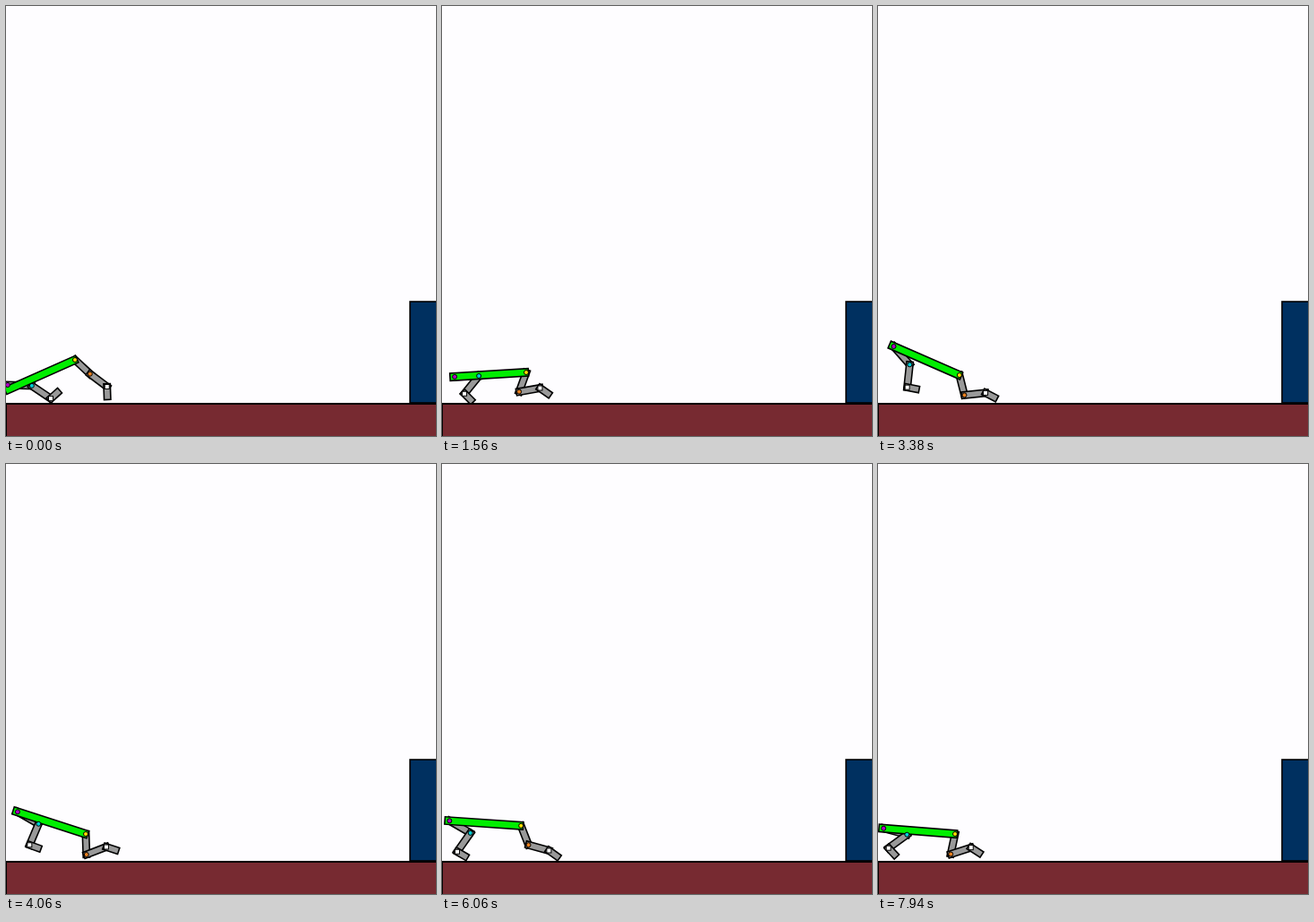
An HTML page that plays this animation: 480x480 px, repeating every 8 s.

```html
<!DOCTYPE html>
<html lang="en">
<head>
<meta charset="utf-8">
<title>Four-legged runner</title>
<style>
  html, body { margin: 0; width: 100%; height: 100%; overflow: hidden; background: #fefdff; }
  svg { display: block; width: 100vw; height: 100vh; }
  #dog rect { stroke: #000; stroke-width: 1.6; }
  #joints > * { stroke: #000; stroke-width: 1; }
</style>
</head>
<body>
<svg viewBox="0 0 480 480">
  <rect width="480" height="480" fill="#fefdff"/>
  <rect x="451" y="330" width="40" height="113" fill="#003060" stroke="#000" stroke-width="1.6"/>
  <g id="dog"></g>
  <rect x="0" y="444" width="490" height="46" fill="#772a31" stroke="#000" stroke-width="2"/>
  <g id="joints"></g>
</svg>
<script>
const NS = 'http://www.w3.org/2000/svg';
const LOOP = 8000, STEP = 62.5, RAD = Math.PI / 180;
const SPAN = 80;

// step, shoulder x, y, body pitch, rear thigh/shin/foot, front thigh/shin/foot, hip slip
const poses = [
  [0, 77, 395, -24, 2, 34, -42, 43, 37, 88, 5],
  [15, 90, 409, -4, 5, 140, 18, 75, 5, 30],
  [25, 94, 409, -3.5, -2, 129, 45, 110, -10, 35],
  [34, 93, 411, 20, 70, 110, 20, 80, 0, 25],
  [43, 95, 413, 26.6, 92, 119, 36, 115, -7, 40],
  [52, 91, 412, 24, 50, 95, 10, 75, -5, 28],
  [65, 89, 413, 18, 30, 113, 20, 88, -21, 18],
  [74, 90, 411, 15, 45, 100, 5, 72, -3, 25],
  [82, 81, 412, 8, 21, 81, 0, 77, -10, 33],
  [96, 88, 404, 4, 30, 125, 30, 68, 15, 35],
  [111, 102, 389, 0, 49, 135, 45, 117, 45, 90],
  [119, 94, 402, 2, 35, 138, 40, 85, 10, 30],
  [127, 86, 413, 4.5, 15, 144, 47, 102, -18, 33]
];

function add(parent, tag, attrs) {
  const el = document.createElementNS(NS, tag);
  for (const k in attrs) el.setAttribute(k, attrs[k]);
  return document.getElementById(parent).appendChild(el);
}

// A bar lies along +x from its joint, overlapping both ends.
const bar = (len, back, front, width, fill) =>
  add('dog', 'rect', { x: -back, y: -width / 2, width: len + back + front, height: width, fill });

const GREY = '#999';
const legs = [[27, 25.5, 13], [23, 23.7, 14]].map(lens => ({
  lens,
  bars: lens.map((len, i) => bar(len, 3.2, i < 2 ? 3.2 : 0.5, 7.4, GREY))
}));
const body = bar(SPAN, 5.2, 2.4, 8.4, '#00ee00');

const dot = fill => add('joints', 'circle', { r: 2.5, fill });
const pad = () => add('joints', 'rect', { x: -2.5, y: -2.5, width: 5, height: 5, fill: '#fff' });
const dots = [
  [dot('#b000c8'), dot('#00d0d8'), pad()],
  [dot('#ffe000'), dot('#e88020'), pad()]
];

const move = ([x, y], angle, len) =>
  [x + len * Math.cos(angle * RAD), y + len * Math.sin(angle * RAD)];
const place = (el, [x, y], angle = 0) =>
  el.setAttribute('transform', `translate(${x.toFixed(2)} ${y.toFixed(2)}) rotate(${angle.toFixed(2)})`);

function poseAt(step) {
  let i = 0;
  while (i < poses.length - 2 && step >= poses[i + 1][0]) i++;
  const a = poses[i], b = poses[i + 1];
  const u = Math.min(1, (step - a[0]) / (b[0] - a[0]));
  const e = u * u * (3 - 2 * u);
  return Array.from({ length: 11 }, (_, k) => (a[k] || 0) + ((b[k] || 0) - (a[k] || 0)) * e);
}

function drawLeg(n, joint, angles) {
  const { lens, bars } = legs[n];
  angles.forEach((angle, i) => {
    place(bars[i], joint, angle);
    place(dots[n][i], joint);
    joint = move(joint, angle, lens[i]);
  });
}

function render(ms) {
  const step = Math.min(127, Math.floor((ms % LOOP + 5) / STEP));
  const [, x, y, pitch, ...rest] = poseAt(step);
  const shoulder = [x, y];
  const hip = move(shoulder, pitch, -SPAN);
  place(body, hip, pitch);
  drawLeg(0, move(hip, pitch - 90, rest[6]), rest.slice(0, 3));
  drawLeg(1, shoulder, rest.slice(3, 6));
}

const start = performance.now();
function tick() {
  render(performance.now() - start);
  requestAnimationFrame(tick);
}
tick();
</script>
</body>
</html>
```
